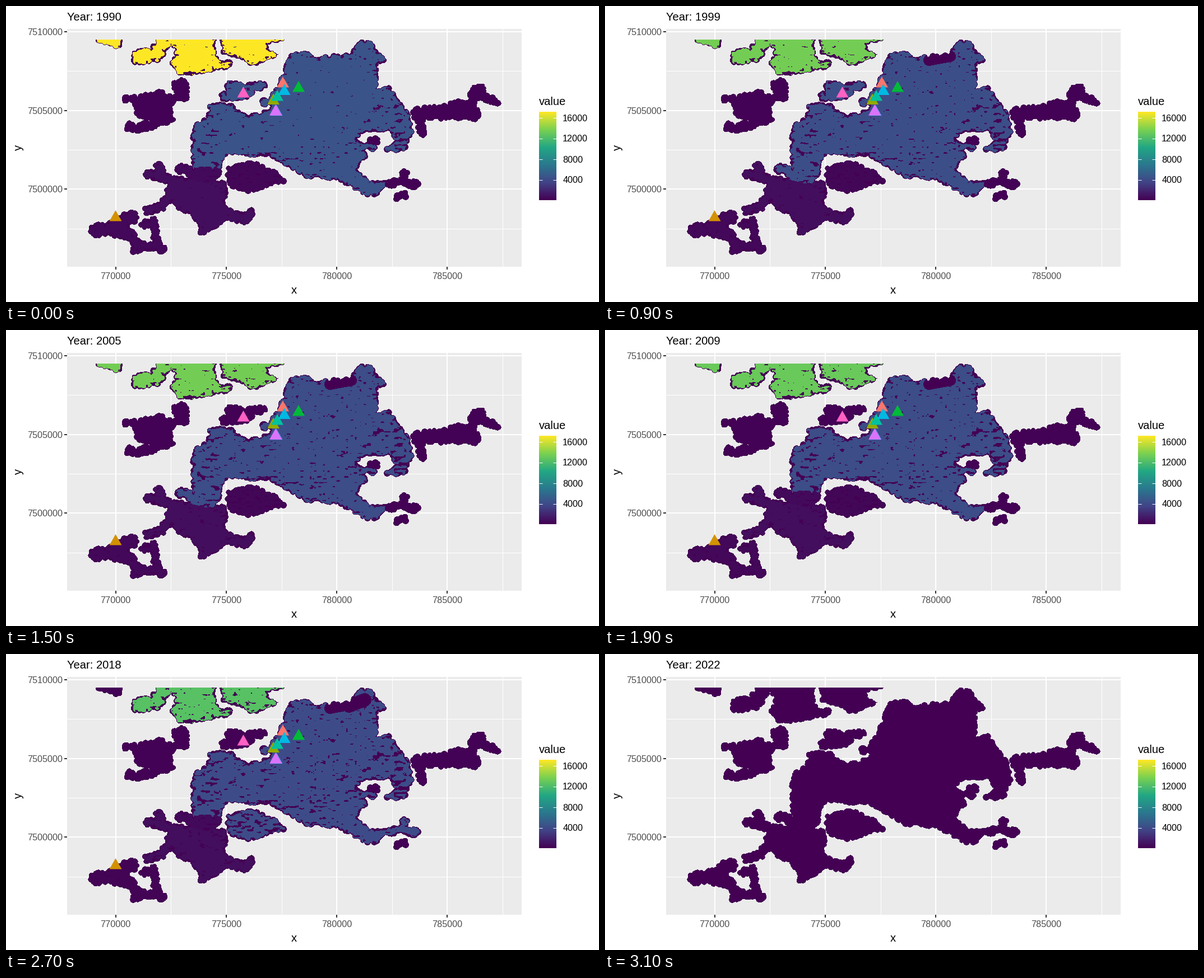
Write a matplotlib script that moves like this. It is 1058 by 529 pixels and loops after 3.2 s.

```python
import numpy as np
import matplotlib.pyplot as plt
from matplotlib.animation import FuncAnimation
from matplotlib.colors import LinearSegmentedColormap
from matplotlib.patches import Polygon, Rectangle
from matplotlib.path import Path

W, H = 1058, 529
FRAMES, STEP = 32, 100
TOP_CUT = 60
PT = 0.72  # points per pixel at 100 dpi

plt.rcParams["font.family"] = "Liberation Sans"
CMAP = LinearSegmentedColormap.from_list(
    "value", ["#440154", "#414487", "#2A788E", "#22A884", "#7AD151", "#FDE725"], N=512)

Y, X = np.mgrid[0:H, 0:W] + 0.5
rng = np.random.default_rng(8)


def noise(cx, cy):
    """Smooth value noise with cells of cx by cy pixels."""
    grid = rng.random((int(H / cy) + 3, int(W / cx) + 3))
    u, v = X / cx, Y / cy
    i, j = v.astype(int), u.astype(int)
    a, b = u - j, v - i
    a, b = a * a * (3 - 2 * a), b * b * (3 - 2 * b)
    upper = grid[i, j] * (1 - a) + grid[i, j + 1] * a
    lower = grid[i + 1, j] * (1 - a) + grid[i + 1, j + 1] * a
    return upper * (1 - b) + lower * b


def ranked(field):
    """Spread the field evenly over 0..1."""
    order = np.argsort(np.argsort(field.ravel()))
    return (order / order.size).reshape(field.shape)


def bump(x, y, rx, ry):
    return np.exp(-((X - x) / rx) ** 2 - ((Y - y) / ry) ** 2)


def depth_of(mask, limit=9):
    """Steps from the outside, counted up to the limit."""
    depth = np.zeros(mask.shape, int)
    for _ in range(limit):
        depth += mask
        mask = (mask & np.roll(mask, 1, 0) & np.roll(mask, -1, 0)
                & np.roll(mask, 1, 1) & np.roll(mask, -1, 1))
    return depth


def band(radius, *pts):
    """Everything within a radius of a path."""
    hit = np.zeros((H, W), bool)
    for (ax_, ay), (bx, by) in zip(pts, pts[1:]):
        dx, dy = bx - ax_, by - ay
        t = np.clip(((X - ax_) * dx + (Y - ay) * dy) / (dx * dx + dy * dy), 0, 1)
        hit |= (X - ax_ - t * dx) ** 2 + (Y - ay - t * dy) ** 2 < radius ** 2
    return hit


def area(*pts):
    return Path(pts).contains_points(np.c_[X.ravel(), Y.ravel()]).reshape(H, W)


def scallop(mask):
    """Rebuild the rim from random overlapping discs."""
    depth = depth_of(mask)
    out = depth >= 4
    rim = np.argwhere((depth >= 4) & (depth < 8))
    for y, x in rim[rng.random(len(rim)) < 0.09]:
        box = np.s_[max(y - 7, 0):y + 8, x - 7:x + 8]
        out[box] |= np.hypot(X[box] - x, Y[box] - y) < rng.uniform(3.5, 6)
    return out


# Land masses from a few key points each
land = {name: scallop(mask) for name, mask in {
    "nub": band(11, (172, 56), (199, 64)),
    "top": (
        band(14, (236, 92), (268, 86), (284, 62))
        | area((274, 45), (376, 45), (376, 92), (405, 98), (398, 113), (330, 125),
               (306, 124), (292, 105), (303, 88), (298, 76))
        | area((382, 45), (499, 45), (496, 64), (466, 68), (470, 79), (495, 86),
               (440, 109), (424, 96), (384, 88))),
    "west": (
        band(15, (311, 144), (313, 158))
        | band(24, (252, 180), (272, 178))
        | band(9, (274, 157), (294, 170), (288, 188), (294, 203), (236, 219), (218, 215))
        | band(7, (215, 167), (235, 166))),
    "islet": band(9, (398, 143), (428, 146), (459, 141)) | band(10, (391, 162), (434, 156)),
    "woods": (
        band(9, (254, 301), (300, 312), (340, 322)) | band(9, (273, 283), (278, 304))
        | area((284, 324), (330, 306), (394, 314), (396, 342), (390, 356), (406, 362),
               (398, 386), (350, 398), (332, 376), (304, 364), (284, 342))
        | band(9, (253, 367), (276, 360), (298, 338))
        | band(10, (390, 370), (424, 382), (436, 371))
        | band(9, (349, 401), (372, 393))),
    "corner": (
        band(13, (160, 403), (192, 395), (224, 378)) | band(13, (196, 402), (214, 407))
        | band(9, (222, 408), (238, 428), (282, 434)) | band(8, (230, 437), (250, 432))
        | band(8, (246, 392), (264, 384), (266, 408), (270, 424))),
    "arm": band(10, (313, 291), (340, 300), (374, 298)) | band(9, (340, 304), (366, 309)),
    "lobe": area((392, 312), (394, 288), (440, 276), (482, 295), (501, 315), (432, 335),
                 (396, 323)),
    "east": (
        band(14, (738, 193), (790, 190), (834, 192)) | band(9, (736, 196), (742, 228))
        | band(9, (794, 175), (834, 180), (836, 160)) | band(13, (838, 158), (844, 151))
        | band(8, (850, 162), (876, 173)) | band(7, (700, 343), (711, 338))
        | band(7, (653, 241), (661, 241))),
    "tail": band(8, (686, 318), (710, 314), (712, 299)) | band(9, (712, 314), (730, 320)),
    "main": (
        area((470, 236), (470, 164), (486, 140), (504, 88), (534, 80), (552, 92),
             (612, 83), (636, 61), (654, 61), (662, 82), (684, 98), (665, 104),
             (663, 148), (684, 144), (720, 192), (728, 226), (712, 263), (672, 259),
             (692, 246), (686, 224), (640, 226), (600, 240))
        | area((474, 200), (640, 222), (626, 238), (646, 268), (624, 292), (650, 314),
               (690, 313), (664, 340), (640, 340), (594, 312), (536, 308), (474, 270),
               (405, 268), (400, 210))
        | area((476, 184), (430, 195), (400, 173), (362, 173), (358, 198), (336, 210),
               (330, 245), (333, 288), (383, 300), (394, 266), (476, 268))
        | band(7, (630, 246), (656, 255)) | band(7, (460, 173), (476, 173))),
}.items()}

shape = np.any(list(land.values()), axis=0)
depth = depth_of(shape)
shape &= Y > TOP_CUT

# Bare ground that appears at the north edge
bare = band(10, (578, 97), (616, 90))
bare_late = band(12, (612, 93), (640, 82))

fringe = depth <= 1.6 + 4 * ranked(noise(9, 7)) ** 2
fleck = ranked(0.75 * noise(8, 3.5) + 0.25 * noise(3, 2))
patchy = (bump(570, 266, 75, 14) + bump(688, 185, 32, 32) + bump(360, 235, 32, 32)
          + bump(362, 275, 32, 22) + bump(425, 152, 45, 22) + bump(440, 305, 60, 25)
          + bump(650, 90, 22, 22) + bump(690, 245, 35, 22))
edge_rate = 0.22 * np.clip(1 - (depth - 2) / 7, 0, 1)


def levels(k):
    """Share of the colour scale for each piece of land."""
    top = np.interp(k, [0, 8, 9, 15, 30], [1, 0.975, 0.785, 0.785, 0.705])
    main = np.interp(k, [0, 6, 8, 9, 30], [0.26, 0.278, 0.278, 0.24, 0.232])
    low = 0.006
    return {
        "top": top,
        "nub": top if k < 27 else low,
        "main": main,
        "islet": main if k < 12 else low,
        "woods": 0.04,
        "arm": main if 3 <= k < 19 else 0.03,
        "lobe": main if 4 <= k < 9 or k >= 27 else 0.02,
        "tail": main if k >= 20 else low,
        "corner": 0.022 if k < 25 else 0.01,
        "west": low,
        "east": low,
    }


def raster(k):
    share = np.zeros((H, W))
    if k < FRAMES - 1:
        rate = 0.008 + 0.0016 * k + edge_rate + patchy * (0.12 + 0.003 * k)
        core = shape & ~fringe & (fleck > rate)
        if k >= 8:
            core &= ~bare
        if k >= 24:
            core &= ~bare_late
        for name, level in levels(k).items():
            share[core & land[name]] = level
    rgba = CMAP(share, bytes=True)
    rgba[..., 3] = 255 * shape
    return rgba


fig = plt.figure(figsize=(W / 100, H / 100), dpi=100, facecolor="white")
ax = fig.add_axes([0, 0, 1, 1])
ax.axis("off")


def line(xs, ys, color, width, z=1):
    ax.plot(xs, ys, color=color, lw=width * PT, solid_capstyle="butt", zorder=z)


def label(x, y, text, size, color="black", **kw):
    return ax.text(x, y, text, fontsize=size * PT, color=color, **kw)


# Panel and axes
L, R, T, B = 109, 920, 41, 466
ax.add_patch(Rectangle((L, T), R - L, B - T, fc="#EBEBEB", lw=0, zorder=0))
for i in range(4):
    x = 195.7 + 197.2 * i
    line([x + 98.6] * 2, [T, B], "white", 1)
    line([x, x], [T, B], "white", 2)
    line([x, x], [B, B + 5], "#333333", 2)
    label(x, 488, f"{770000 + 5000 * i}", 16.1, "#4D4D4D", ha="center")
for i in range(3):
    y = 46 + 140.6 * i
    line([L, R], [y + 70.3] * 2, "white", 1)
    line([L, R], [y, y], "white", 2)
    line([L - 5, L], [y, y], "#333333", 2)
    label(101, y + 6, f"{7510000 - 5000 * i}", 16.1, "#4D4D4D", ha="right")
label(514, 514, "x", 20.2, ha="center")
label(22, 253, "y", 20.2, ha="center", va="center", rotation=90)
title = label(109, 26, "", 20.2)

# Legend
label(950.5, 177, "value", 20.2)
ax.imshow(np.linspace(1, 0, 158)[:, None], cmap=CMAP, extent=(951, 982, 347, 189),
          aspect="auto", zorder=2)
for i in range(4):
    y = 199.5 + 37 * i
    for x in (951, 975.8):
        line([x, x + 6.2], [y, y], "white", 1, 3)
    label(993.2, y + 6, f"{16000 - 4000 * i}", 16.1)

# Sites: centre, apex height, colour
SITES = [(494, 126, "#F8766D"), (195.5, 365, "#D39200"), (477, 156.5, "#93AA00"),
         (522, 134, "#00BA38"), (484, 150, "#00C19F"), (496.5, 139.5, "#00B9E3"),
         (482.5, 176.5, "#619CFF"), (481, 176, "#DB72FB"), (423.5, 144, "#FF61C3")]
marks = [ax.add_patch(Polygon([(x, y), (x + 11, y + 19.5), (x - 11, y + 19.5)],
                              fc=c, lw=0, zorder=4)) for x, y, c in SITES]

terrain = ax.imshow(raster(0), extent=(0, W, H, 0), interpolation="nearest",
                    aspect="auto", zorder=2)
ax.set_xlim(0, W)
ax.set_ylim(H, 0)


def draw(k):
    year = 1990 + k + (k >= 22)  # 2012 has no data
    title.set_text(f"Year: {year}")
    terrain.set_data(raster(k))
    for mark in marks:
        mark.set_visible(k < FRAMES - 1)
    return [title, terrain, *marks]


anim = FuncAnimation(fig, draw, frames=FRAMES, interval=STEP, repeat=True)
plt.show()
```
